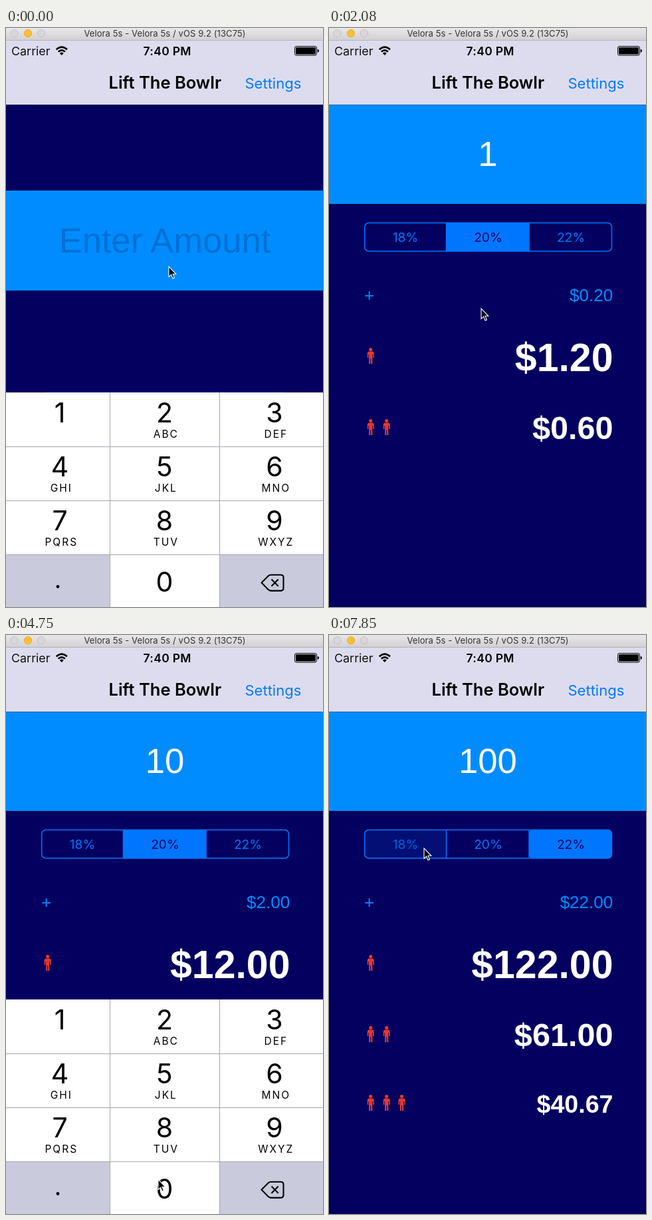
Write an HTML page that moves like this. It is 477 px wide and 869 px high and loops after 8000 ms.

```html
<!DOCTYPE html>
<html lang="en">
<head>
<meta charset="utf-8">
<title>Tip calculator</title>
<style>
  html, body { margin: 0; width: 100%; height: 100%; overflow: hidden; background: #04005f; }
  svg { display: block; width: 477px; height: 869px; }
  text { font-family: Inter, "Open Sans", sans-serif; }
  .mid { text-anchor: middle; }
  .end { text-anchor: end; }
  .helv { font-family: "Liberation Sans", Arial, sans-serif; }
  .bold { font-weight: 700; fill: #fff; }
  .digit { font-size: 41px; }
  .abc { font-size: 15.5px; letter-spacing: 2px; }
  .seg { font-size: 19.2px; }
</style>
</head>
<body>
<svg viewBox="0 0 477 869">
  <defs>
    <linearGradient id="chrome" x2="0" y2="1">
      <stop stop-color="#e9e7e9"/><stop offset="1" stop-color="#d2d0d2"/>
    </linearGradient>
    <g id="person" fill="#e5382e">
      <path d="M-3-6.500H3Q5-6 5-3.500V3H3.400V-2H2.600V12H.5V4H-.5V12H-2.600V-2H-3.400V3H-5V-3.500Q-5-6-3-6.500Z"/>
      <circle cy="-9.500" r="2.600"/>
    </g>
  </defs>
  <rect width="477" height="869" fill="#04005f"/>

  <g id="box">
    <rect width="477" height="150" fill="#008cff"/>
    <text id="entry" class="mid helv" x="239" y="93" font-size="52.600"></text>
    <rect id="caret" y="41" width="2.400" height="64" fill="#3f63f2"/>
  </g>

  <g id="details">
    <g id="segments"></g>
    <rect x="53.700" y="292.600" width="371.800" height="42.300" rx="6" fill="none" stroke="#0076ff" stroke-width="1.500"/>
    <g fill="#008cff" font-size="26">
      <text class="helv" x="53" y="410">+</text>
      <text id="tip" class="helv end" x="427.200" y="410"></text>
    </g>
    <g id="rows"></g>
  </g>

  <g id="keyboard"></g>

  <rect y="18" width="477" height="97" fill="#dddcee"/>
  <rect y="115" width="477" height=".8" fill="#000" opacity=".35"/>
  <rect width="477" height="18" fill="url(#chrome)"/>
  <rect y="18" width="477" height="1" fill="#b6b4b9"/>
  <g stroke-width=".8">
    <circle cx="12.500" cy="8" r="5.600" fill="#d9d7d9" stroke="#bbb9bb"/>
    <circle cx="33" cy="8" r="5.600" fill="#ffbf2d" stroke="#dea032"/>
    <circle cx="53" cy="8" r="5.600" fill="#d9d7d9" stroke="#bbb9bb"/>
  </g>
  <text class="mid" x="239" y="12.700" font-size="13" letter-spacing=".1" fill="#333">Velora 5s - Velora 5s / vOS 9.2 (13C75)</text>
  <text x="8" y="41" font-size="17.900" fill="#111">Carrier</text>
  <g fill="none" stroke="#000" stroke-width="2.600">
    <path d="M75.700 32.300Q83.800 24.800 91.900 32.300M78.700 35.600Q83.800 31 88.900 35.600"/>
    <path d="M83.800 41L80.900 37.900Q83.800 35.300 86.700 37.900Z" fill="#000" stroke="none"/>
  </g>
  <text class="mid" x="242.700" y="41" font-size="17.500" font-weight="600" letter-spacing=".3">7:40 PM</text>
  <rect x="434.500" y="27.500" width="33" height="13.500" rx="2.500" fill="none" stroke="#000"/>
  <rect x="436" y="29" width="30" height="10.500" rx="1.200"/>
  <path d="M468.800 31.800Q471 32.200 471 34.200T468.800 36.700Z"/>
  <text class="mid" x="239.300" y="91" font-size="25.500" font-weight="600">Lift The Bowlr</text>
  <text x="359.500" y="90.500" font-size="22" fill="#007aff">Settings</text>

  <path id="pointer" d="M0 0V15.500L3.600 12.200L6.100 18L8.400 17L6 11.300H10.800Z" stroke="#fff" stroke-width="1.100"/>
</svg>
<script>
const LOOP = 8000, CENTER = 239;
const RATES = [18, 20, 22];
const $ = id => document.getElementById(id);

// Keypad
const COLS = [[0, 156.5, 81], [156.5, 165, 238.5], [321.5, 155.5, 404]];
const LETTERS = ['', 'ABC', 'DEF', 'GHI', 'JKL', 'MNO', 'PQRS', 'TUV', 'WXYZ'];
const key = (col, row, label, letters = '', id = '', fill = '#fff') => {
  const [x, w, mid] = COLS[col], y = 547 + 81 * row;
  const base = row < 3 ? y + 45 : 846;
  return `<rect id="${id}" x="${x}" y="${y}" width="${w}" height="82" fill="${fill}"/>
    <text class="mid digit" x="${mid}" y="${base}">${label}</text>
    <text class="mid abc" x="${mid + 2.3}" y="${y + 68}">${letters}</text>`;
};
const GREY = '#c9cbdc';
$('keyboard').innerHTML =
  LETTERS.map((l, i) => key(i % 3, Math.floor(i / 3), i + 1, l, 'key' + (i + 1))).join('') +
  key(0, 3, '', '', '', GREY) + key(1, 3, 0, '', 'key0') + key(2, 3, '', '', '', GREY) +
  `<path d="M0 628.500H477M0 709.500H477M0 790.500H477M156.500 547V869M321.500 547V869" stroke="#a5a6b0"/>
   <circle cx="78" cy="838.500" r="2.400"/>
   <path d="M384.500 832.500L394.500 822.500Q396.300 820.800 398.500 820.800H413.500Q417.500 820.800 417.500 824.800V840.600Q417.500 844.600 413.500 844.600H398.500Q396.300 844.600 394.500 842.800ZM399.500 827.500L409.700 837.700M409.700 827.500L399.500 837.700"
     fill="none" stroke="#000" stroke-width="2.100" stroke-linejoin="round"/>`;

// Percentage control
const EDGES = [53.5, 176.5, 301, 425.7];
$('segments').innerHTML = RATES.map((r, i) =>
  `<rect id="seg${i}" x="${EDGES[i]}" y="292.500" width="${EDGES[i + 1] - EDGES[i]}" height="42.700" rx="${i === 1 ? 0 : 5}" fill="#0076ff"/>
   <text id="rate${i}" class="mid seg" x="${[115, 239.5, 364][i]}" y="321">${r}%</text>`).join('') +
  '<path d="M176.500 293V335M301 293V335" stroke="#0076ff" stroke-width="1.500"/>';

// Totals split between one, two and three people
const ROWS = [[492, 515, 59], [599, 617, 48.6], [702, 717, 37.6]];
$('rows').innerHTML = ROWS.map(([y, base, size], i) =>
  `<g id="row${i}">` +
  [62.7, 86.7, 109.5].slice(0, i + 1).map(x => `<use href="#person" x="${x}" y="${y}"/>`).join('') +
  `<text id="share${i}" class="helv bold end" x="427.500" y="${base}" font-size="${size}"></text></g>`).join('');

const ease = (t, start, length) => {
  const p = Math.min(1, Math.max(0, (t - start) / length));
  return p * p * (3 - 2 * p);
};
const within = (t, a, b) => t >= a && t < b;

// Pointer stops: time, x, y
const PATH = [
  [0, 245, 358], [60, 245, 358], [150, 236, 380], [420, 236, 380], [800, 86, 615], [960, 86, 615],
  [1200, 221, 438], [1600, 222, 436], [2080, 229, 421], [2380, 230, 420], [2600, 230, 420],
  [2920, 240, 205], [3120, 240, 205], [3800, 229, 817], [5080, 229, 817],
  [5640, 263, 429], [5950, 290, 400], [6250, 356, 312], [6500, 356, 312],
  [6900, 263, 408], [7200, 263, 408], [7720, 143, 320], [LOOP, 143, 320]
];
const pointerAt = t => {
  const i = PATH.findIndex(p => p[0] > t), [t0, x0, y0] = PATH[i - 1], [t1, x1, y1] = PATH[i];
  const p = ease(t, t0, t1 - t0);
  return [x0 + (x1 - x0) * p, y0 + (y1 - y0) * p];
};

const TYPED = [[970, '1'], [4250, '10'], [4930, '100']];
const BLINKS = [100, 970, 3060, 4250, 4930];
const move = (id, x, y) => $(id).setAttribute('transform', `translate(${x} ${y})`);
const setText = (id, s) => { if ($(id).textContent !== s) $(id).textContent = s; };
const paint = (id, fill, opacity = 1) => {
  $(id).setAttribute('fill', fill);
  $(id).setAttribute('opacity', opacity);
};

function draw(t) {
  const typed = TYPED.filter(k => k[0] <= t).map(k => k[1]).pop();
  const amount = Number(typed || 1);
  const picked = t < 6400 ? 1 : 2;
  const pressed = within(t, 6300, 6400) ? 2 : t >= 7800 ? 0 : -1;

  const lift = 1 - ease(t, 977, 440);
  move('box', 0, 114 + 130 * lift);
  move('details', 0, 255 * lift);
  move('keyboard', 0, 324 * (ease(t, 1600, 350) - ease(t, 3060, 350) + ease(t, 7060, 330)));

  setText('entry', typed || 'Enter Amount');
  paint('entry', typed ? '#fff' : '#0070d4');
  const half = $('entry').getComputedTextLength() / 2;
  $('caret').setAttribute('x', CENTER + (typed ? half - 1.2 : -half - 1));
  const focused = t < 1600 || within(t, 3060, 7050);
  const since = t - BLINKS.filter(b => b <= t).pop();
  paint('caret', '#3f63f2', focused && since % 1000 < 500 ? 1 : 0);

  RATES.forEach((_, i) => {
    const on = i === picked, down = i === pressed;
    paint('seg' + i, '#0076ff', on ? 1 : down ? .13 : 0);
    paint('rate' + i, on ? '#04005f' : '#0076ff', down ? .8 : 1);
  });

  const tip = amount * RATES[picked] / 100;
  setText('tip', '$' + tip.toFixed(2));
  ROWS.forEach((_, i) => {
    const share = (amount + tip) / (i + 1);
    setText('share' + i, '$' + share.toFixed(2));
    $('row' + i).setAttribute('opacity', share >= .5 ? 1 : 0);
  });

  paint('key1', within(t, 850, 970) ? GREY : '#fff');
  paint('key0', within(t, 4130, 4250) || within(t, 4820, 4930) ? GREY : '#fff');
  move('pointer', ...pointerAt(t));
}

const start = performance.now();
function tick() {
  draw((performance.now() - start) % LOOP);
  requestAnimationFrame(tick);
}
tick();
</script>
</body>
</html>
```
